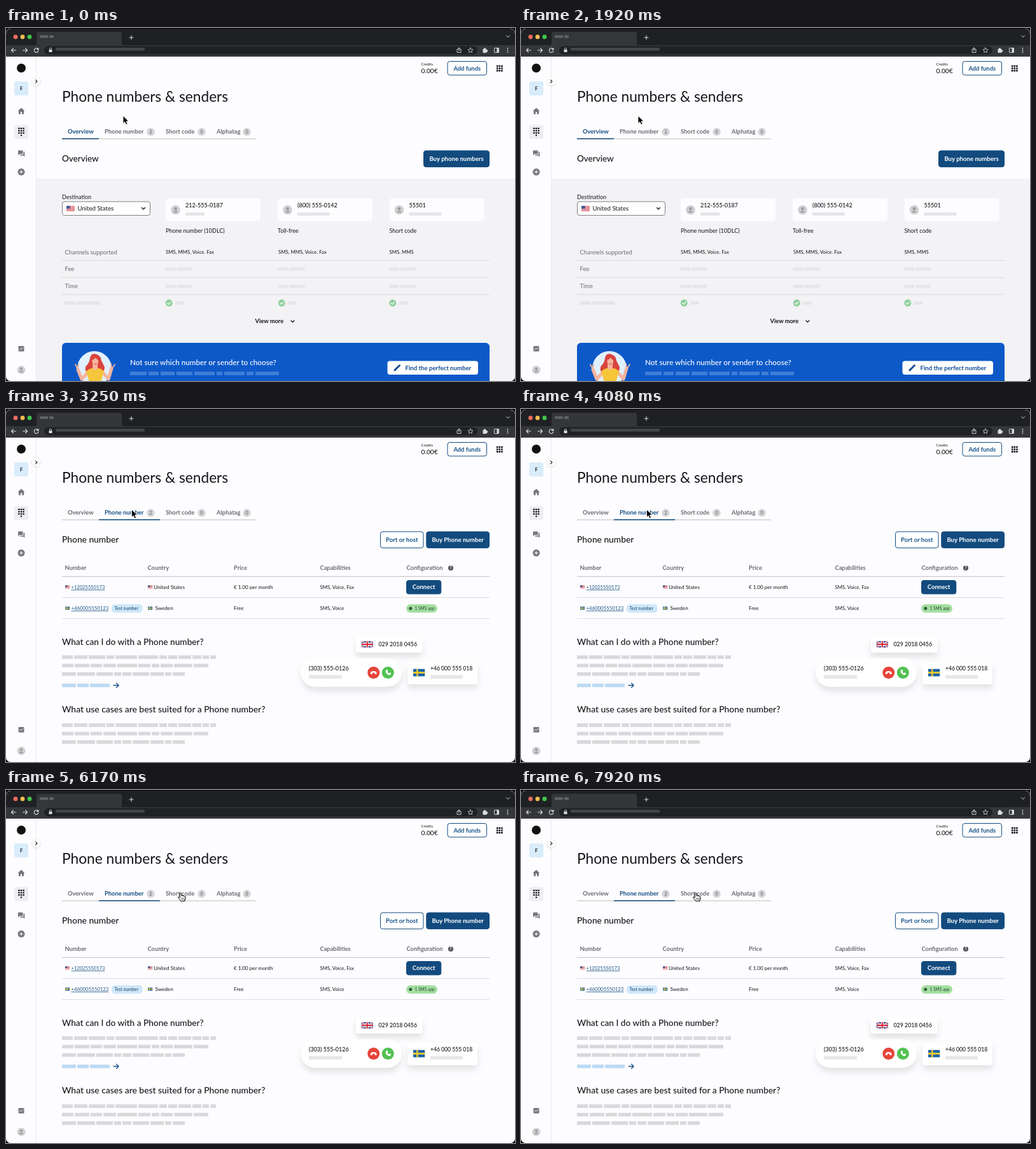
Write an HTML page that moves like this. It is 800 px wide and 555 px high and loops after 8 s.

```html
<!DOCTYPE html>
<html lang="en">
<head>
<meta charset="utf-8">
<title>Phone numbers &amp; senders</title>
<style>
html, body { margin: 0; width: 100%; height: 100%; overflow: hidden; background: #000; }
svg { display: block; width: 100vw; height: 100vh; font-family: Lato, "Open Sans", sans-serif; }
</style>
</head>
<body>
<svg id="stage" viewBox="0 0 800 555"></svg>
<script>
const NAVY = '#134b7f', INK = '#17171b', GREY = '#6c6b70', PAGE = '#fdfcfe', LOOP = 8000;

const text = (x, y, str, size, fill = INK, weight = 400, more = '') =>
  `<text x="${x}" y="${y}" font-size="${size}" fill="${fill}" font-weight="${weight}" ${more}>${str.replace(/&/g, '&amp;')}</text>`;
const centered = (x, y, str, size, fill, weight) => text(x, y, str, size, fill, weight, 'text-anchor="middle"');
const rect = (x, y, w, h, fill, r = 0, more = '') =>
  `<rect x="${x}" y="${y}" width="${w}" height="${h}" rx="${r}" fill="${fill}" ${more}/>`;
const circle = (x, y, r, fill, more = '') => `<circle cx="${x}" cy="${y}" r="${r}" fill="${fill}" ${more}/>`;
const fillPath = (d, fill, more = '') => `<path d="${d}" fill="${fill}" ${more}/>`;
const line = (d, stroke, w = 1.2) =>
  `<path d="${d}" fill="none" stroke="${stroke}" stroke-width="${w}" stroke-linecap="round" stroke-linejoin="round"/>`;
const rule = (x1, x2, y, stroke, w = 1) => rect(x1, y - w / 2, x2 - x1, w, stroke);
const at = (x, y, body) => `<g transform="translate(${x} ${y})">${body}</g>`;
const each = (list, draw) => list.map(draw).join('');

// Row of placeholder words laid out from the left
function words(x, y, widths, fill, gap = 2, h = 5.6) {
  return each(widths, w => {
    const bar = rect(x, y, w, h, fill);
    x += w + gap;
    return bar;
  });
}

const dots = (x, y, step, r, fill) =>
  each([-1, 0, 1], i => each([-1, 0, 1], j => rect(x + i * step - r, y + j * step - r, 2 * r, 2 * r, fill, r * .4)));

const avatar = (x, y, r) => circle(x, y, r, '#d0cfd1') +
  circle(x, y - r * .25, r * .32, '#9b9a9d') +
  fillPath(`M${x - r * .6} ${y + r * .55}q${r * .6} ${-r * .7} ${r * 1.2} 0z`, '#9b9a9d');

const button = (x, y, w, h, label, solid = true, size = 9.6) =>
  rect(x + .5, y + .5, w - 1, h - 1, solid ? NAVY : '#fff', 3.5, `stroke="${NAVY}"`) +
  centered(x + w / 2, y + h / 2 + 3.3, label, size, solid ? '#fff' : '#185488', 700);

function flag(kind, x, y, w, h) {
  const art = {
    us: rect(0, 0, 18, 10, '#f3e4e6') + each([0, 1, 2, 3, 4], i => rect(0, i * 2.25, 18, 1.1, '#d8414d')) +
      rect(0, 0, 8, 5.5, '#40588f'),
    se: rect(0, 0, 18, 10, '#1c63a5') + rect(5, 0, 2.4, 10, '#f3ca30') + rect(0, 3.8, 18, 2.4, '#f3ca30'),
    uk: rect(0, 0, 18, 10, '#263d86') + line('M0 0L18 10M18 0L0 10', '#fff', 2) +
      line('M0 0L18 10M18 0L0 10', '#d3283b', .7) + rect(7, 0, 4, 10, '#fff') + rect(0, 3.2, 18, 3.6, '#fff') +
      rect(8, 0, 2, 10, '#d3283b') + rect(0, 4, 18, 2, '#d3283b')
  }[kind];
  return `<svg x="${x}" y="${y}" width="${w}" height="${h}" viewBox="0 0 18 10" preserveAspectRatio="none">${art}</svg>`;
}

function browser() {
  const light = '#dadbde', dim = '#626369';
  return rect(0, 1, 800, 30, '#1f2023', 8) + rect(0, 20, 800, 8, '#1f2023') +
    each(['#ed6b5f', '#f4be4f', '#3fc64c'], (c, i) => circle(15 + i * 11, 14, 3.4, c)) +
    fillPath('M46 27q2 0 2-3V10q0-4 4-4h126q4 0 4 4v14q0 3 2 3z', '#35363a') +
    words(53, 11.5, [13, 7], dim, 2, 4) +
    line('M194 15h6M197 12v6', light, 1) + line('M786.5 12l2.5 2.5 2.5-2.5', light, 1) +
    rect(0, 27, 800, 18, '#35363a') + rect(60, 28.5, 681, 13, '#202124', 6.5) +
    line('M15.5 35h-7m3-3l-3 3 3 3M26.5 35h7m-3-3l3 3-3 3', light, 1.1) +
    line('M50.5 33.5a3.3 3.3 0 1 0 .3 2.5M51 31.5v2.5h-2.5', light, 1.1) +
    rect(67.5, 34, 5, 4, light, .6) + line('M68.5 34v-1.2a1.500 1.500 0 0 1 3 0v1.2', light, .9) +
    rect(78, 31, 140, 4.5, '#45464b', 1) +
    line('M710.5 33.5h-1.500v5h6v-5h-1.500M712 36v-5m-1.700 1.700l1.700-1.700 1.700 1.700', light, .9) +
    line('M730 31l1.200 2.600 2.800.3-2.100 1.900.6 2.800-2.500-1.400-2.500 1.400.6-2.800-2.100-1.900 2.800-.3z', light, .8) +
    rect(749.5, 33, 6, 6, light, .8) + circle(752.5, 32.6, 1.4, light) + circle(756, 36, 1.4, light) +
    rect(767.5, 31.5, 7, 7, 'none', .7, `stroke="${light}"`) + rect(771.5, 31.5, 3, 7, light) +
    each([32, 35, 38], y => circle(788.5, y, .9, light));
}

function sidebar() {
  const icon = '#77767a';
  return rect(47, 45, 1, 510, '#ebeaed') +
    circle(24, 63, 7, '#111') +
    rect(13, 84, 22, 22, '#d8ecfb', 3) + centered(24, 98, 'F', 7.5, INK, 700) +
    circle(47.5, 84, 6.3, '#fff', 'filter="url(#soft)"') + line('M46.5 81.6l2.4 2.4-2.4 2.4', INK, 1.1) +
    fillPath('M24 125.5l5.5 5h-1.5v5h-3v-3.500h-2v3.500h-3v-5h-1.500z', icon) +
    rect(13, 152.5, 22, 22, '#eeedf0', 3) + dots(24, 161.5, 3.6, 1.2, INK) + circle(24, 168.7, 1.2, INK) +
    fillPath('M19 192.5h7.5v5.500h-5l-2.500 2z', icon) +
    fillPath('M27.5 194.5h1.800v8l-2.200-2h-4.900v-1.600h5.300z', icon) +
    circle(24, 226.3, 5.5, icon) + line('M21.5 226.3h5M24 223.8v5', '#fff', 1.1) +
    rect(19.5, 500, 9, 8.5, icon, 1) + line('M21 505.8l2-2 1.500 1.200 2.500-2.500', '#fff', .9) +
    avatar(24, 537.5, 6.5);
}

const header = () =>
  text(652.5, 59, 'Credits', 5.9) + text(652.5, 71, '0.00€', 10.3, INK, 500) +
  button(693.5, 52, 62.5, 22.5, 'Add funds', false, 9.4) +
  dots(775.8, 63.5, 3.6, 1.3, INK) +
  text(88, 116, 'Phone numbers & senders', 22.7);

function tabs(active) {
  const items = [
    ['Overview', 97, 0, ''], ['Phone number', 155, 227.5, '2'],
    ['Short code', 251, 307.5, '0'], ['Alphatag', 331, 378.5, '0']
  ];
  const [left, width] = active ? [146, 96] : [88, 58];
  return rule(88, 393, 174.2, '#bebdc1') + rect(left, 173.4, width, 1.5, NAVY) +
    each(items, ([name, x, badge, count], i) =>
      text(x, 166.3, name, 9.4, i === active ? '#174f84' : GREY, 700) +
      (badge ? circle(badge, 163.3, 6.2, '#d5d4d6') + centered(badge, 165.8, count, 7, '#58575c') : ''));
}

function woman() {
  const skin = '#f6b49c', hair = '#d9433c';
  return circle(139, 535, 27, '#e0f0fd') +
    fillPath('M132 519q2-9 10-6 7 2 8 10l5 10q0 9-6 10h-20q-7-5-3-12 5-4 6-12z', hair) +
    line('M129 541l-10 11-6-15M152 541l9 11 5-17', skin, 5) +
    line('M113 537l-4-8M113 536l1-7M166 536l-1-8M166 536l5-7', skin, 1.8) +
    fillPath('M126 540q6-6 14-5 9-1 14 5l-5 17h-18z', '#f5c53a') +
    fillPath('M136 529h8v6q-4 5-8 0z', skin) +
    fillPath('M135 519q5-5 10 0v8q-4 7-9 1z', skin) +
    fillPath('M134 522q1-8 7-8 6 0 7 10-5-2-7-6-3 4-7 4z', hair) +
    line('M138.5 528q2 1.500 4 0', '#b5443f', .9);
}

function overviewPage() {
  const bar = '#e6e5e8', divider = '#dad9dc';
  const columns = [
    [251, 251, '212-555-0187', 30, 'Phone number (10DLC)', 'SMS, MMS, Voice. Fax'],
    [427, 428, '(800) 555-0142', 51, 'Toll-free', 'SMS, MMS, Voice. Fax'],
    [602.5, 602.5, '55501', 51, 'Short code', 'SMS, MMS']
  ];
  return tabs(0) + text(88, 210, 'Overview', 13.5, INK, 500) +
    button(656, 192.4, 104, 26.5, 'Buy phone numbers') +
    rect(48, 237, 752, 318, '#f3f2f4') +
    text(88, 269, 'Destination', 9) + rect(88.5, 273, 138, 21.5, '#fff', 3, 'stroke="#808084"') +
    flag('us', 95, 279.5, 13, 8.5) + text(112.5, 286.6, 'United States', 9.6) +
    line('M213.5 282.5l2.5 2.5 2.5-2.5', INK, 1.3) +
    each(columns, ([x, cell, number, w, label, channels]) =>
      rect(x, 268, 149, 35.5, PAGE, 4) + avatar(x + 15.5, 286, 7.3) +
      text(x + 31, 282.3, number, 9, INK, 500) + rect(x + 31, 290, w, 5, bar) +
      text(x, 322, label, 9) + text(cell, 355.3, channels, 7.8) +
      each([376.5, 403.5], y => words(cell - .5, y, [16, 24], bar, 2, 5)) +
      circle(cell + 5.3, 432.3, 5.5, '#8fcf9d') +
      line(`M${cell + 2.8} 432.5l1.800 1.800 3.400-3.600`, '#fff', 1.2) + rect(cell + 15, 430, 14, 5, bar)) +
    text(92.5, 355.5, 'Channels supported', 9.4, GREY) + text(92.5, 382.3, 'Fee', 9.4, GREY) +
    text(92.5, 409, 'Time', 9.4, GREY) + words(92, 430, [18, 36], bar, 2, 5) +
    each([365.5, 392.5, 419], y => rule(88, 760, y, divider)) +
    text(391.5, 464.3, 'View more', 9.3, INK, 700) + line('M448 460l2.500 2.500 2.500-2.500', INK, 1.3) +
    rect(88, 495, 672, 70, '#0d59c8', 6) + woman() +
    text(195, 529.5, 'Not sure which number or sender to choose?', 11.7, '#fff', 500) +
    words(195, 540.3, [26, 16, 22, 25, 32, 9, 32, 11, 37], '#3f7dd8', 3) +
    rect(599.5, 523.5, 142.5, 21.5, '#fff', 4) +
    at(614.5, 534.5, line('M-3 3l5.500-5.500', '#124b9c', 3) + fillPath('M-5 5l.5-3.500 3 3z', '#124b9c') +
      line('M3.500-3.500l.6-.6', '#124b9c', 2.8)) +
    text(627.5, 537.8, 'Find the perfect number', 9.6, '#124b96', 700);
}

function paragraph(y) {
  const rows = [
    [17, 21, 26, 12, 34, 31, 12, 14, 20, 14, 10, 9],
    [18, 23, 18, 20, 31, 19, 12, 19, 29, 23],
    [22, 28, 26, 11, 14, 26, 21, 10, 19]
  ];
  return each(rows, (widths, i) => words(88, y + i * 13.3, widths, '#d9d8db'));
}

const phone = (x, y, color, angle) => circle(x, y, 9.5, color) +
  `<g transform="translate(${x} ${y}) rotate(${angle})">` +
  fillPath('M-5 1.500q0-4 5-4t5 4q0 1-1 1h-1.800l-.7-2.200q-1.500-.5-3 0l-.7 2.200h-1.800q-1 0-1-1z', '#fff') + '</g>';

function phonePage() {
  const heads = [['Number', 92.5], ['Country', 222.5], ['Price', 358], ['Capabilities', 493.5], ['Configuration', 629.5]];
  const card = (x, y, w, h, r) => rect(x, y, w, h, '#fff', r, 'filter="url(#shadow)"');
  const link = (y, number, size) => text(102.5, y, number, size, '#1b5788', 400, 'text-decoration="underline"');
  return tabs(1) + text(88, 210, 'Phone number', 13.8, INK, 500) +
    button(588, 192.4, 68.5, 26.5, 'Port or host', false) + button(660.3, 192.4, 99.7, 26.5, 'Buy Phone number') +
    each(heads, ([name, x]) => text(x, 253.2, name, 9.3, GREY, 700)) +
    circle(699, 250, 4.1, '#5b5a5f') + centered(699, 252.4, '?', 6.5, '#fff', 700) +
    rule(88, 760, 263.3, '#c0bfc3') + rule(88, 760, 296.5, '#dddce0') + rule(88, 760, 329.5, '#dddce0') +
    flag('us', 93, 277.2, 7.5, 5.2) + link(283, '+12025550173', 7.6) +
    flag('us', 223, 277.2, 7.5, 5.2) + text(232, 283, 'United States', 8.3) +
    text(358, 283, '€ 1.00 per month', 8.1) + text(493.5, 283, 'SMS, Voice, Fax', 7.8) +
    button(629, 269, 55.3, 22.3, 'Connect') +
    flag('se', 93, 310.5, 7.5, 5.2) + link(316.2, '+460005550123', 7.8) +
    rect(166, 307, 48.5, 13.3, '#cfe7fa', 5) + text(170.5, 316, 'Test number', 6.9, '#174267') +
    flag('se', 223, 310.5, 7.5, 5.2) + text(234.5, 316.2, 'Sweden', 8.1) +
    text(358, 316.2, 'Free', 8.1) + text(493.5, 316.2, 'SMS, Voice', 7.8) +
    rect(629, 307, 49, 13.3, '#a5dfa3', 6.6) + circle(635.8, 313.6, 2.5, '#315b38') +
    text(642.5, 316, '1 SMS app', 6.6, '#214c2a') +
    text(88, 370.5, 'What can I do with a Phone number?', 13.7, INK, 500) + paragraph(387.3) +
    words(88, 431.7, [22, 18, 31], '#bddaf2') + line('M169 434.5h8m-3.500-3.500l3.500 3.500-3.500 3.500', '#174f84', 1.3) +
    text(88, 477.2, 'What use cases are best suited for a Phone number?', 13.9, INK, 500) + paragraph(494.3) +
    card(550, 357, 104.5, 26, 4) + flag('uk', 558.5, 365, 18.5, 10) + text(585.5, 373.2, '029 2018 0456', 8.8, INK, 500) +
    card(463.5, 392, 158.5, 44.5, 22.2) + text(476, 410.8, '(303) 555-0126', 9, INK, 500) +
    rect(476, 418.3, 52, 5.5, '#e7e6e9') +
    phone(577.7, 414.5, '#e6443b', 0) + phone(600.3, 414.5, '#52c152', -135) +
    card(631.5, 397, 109.5, 35.5, 4) + flag('se', 640, 408.5, 18.5, 12) +
    text(667, 410.8, '+46 000 555 018', 8.6, INK, 500) + rect(667, 418.3, 51, 5.5, '#e7e6e9');
}

const arrow = fillPath('M0 0v12.300l2.800-2.600 2 4.300 2.300-1-2-4.200h3.900z', '#000', 'stroke="#fff" stroke-width=".9"');
const hand = fillPath('M-1.300 1q1.300-1.800 2.500 0v4q1.400-1 2.100.4 1.500-.9 2.100.5 1.900-.8 2.100 1.100v2.500q0 1-1 2.200v1.600h-6.500q-1-2.200-3.700-5-1-1.800 1-1.700l1.400 1.200z',
  '#fff', 'stroke="#000" stroke-width="1" stroke-linejoin="round"') + line('M1.500 8.500v2.500M3.500 8.500v2.500M5.500 8.500v2.500', '#000', .7);

const stage = document.getElementById('stage');
stage.innerHTML = `<defs>
  <filter id="soft" x="-50%" y="-50%" width="200%" height="200%"><feDropShadow dx="0" dy=".5" stdDeviation="1" flood-opacity=".25"/></filter>
  <filter id="shadow" x="-20%" y="-40%" width="140%" height="240%"><feDropShadow dx="0" dy="7" stdDeviation="5" flood-opacity=".1"/></filter>
  <clipPath id="window"><rect y="1" width="800" height="554" rx="7"/></clipPath></defs>
  <g clip-path="url(#window)">${rect(0, 0, 800, 555, PAGE)}
  <g id="overview">${overviewPage()}</g><g id="numbers">${phonePage()}</g>
  ${sidebar()}${header()}${browser()}</g>
  <g id="cursor"><g id="arrow">${arrow}</g><g id="hand">${hand}</g></g>`;

const part = id => document.getElementById(id);
const [overview, numbers, cursor, arrowPart, handPart] = ['overview', 'numbers', 'cursor', 'arrow', 'hand'].map(part);
const show = (node, on) => node.setAttribute('display', on ? 'inline' : 'none');

const PAGE_SWITCH = 3250, HAND_SWITCH = 5830;
// start, end, from x, from y, to x, to y
const MOVES = [
  [2330, 2920, 184, 138, 197.5, 158],
  [5080, 6000, 197.5, 158, 274.6, 161.3]
];
const ease = p => p < .5 ? 4 * p ** 3 : 1 - (2 - 2 * p) ** 3 / 2;

function draw(t) {
  const [start, end, x1, y1, x2, y2] = t < MOVES[1][0] ? MOVES[0] : MOVES[1];
  const p = ease(Math.min(1, Math.max(0, (t - start) / (end - start))));
  cursor.setAttribute('transform', `translate(${x1 + (x2 - x1) * p} ${y1 + (y2 - y1) * p})`);
  show(overview, t < PAGE_SWITCH);
  show(numbers, t >= PAGE_SWITCH);
  show(arrowPart, t < HAND_SWITCH);
  show(handPart, t >= HAND_SWITCH);
}

const origin = performance.now();
function tick() {
  draw((performance.now() - origin) % LOOP);
  requestAnimationFrame(tick);
}
tick();
</script>
</body>
</html>
```
